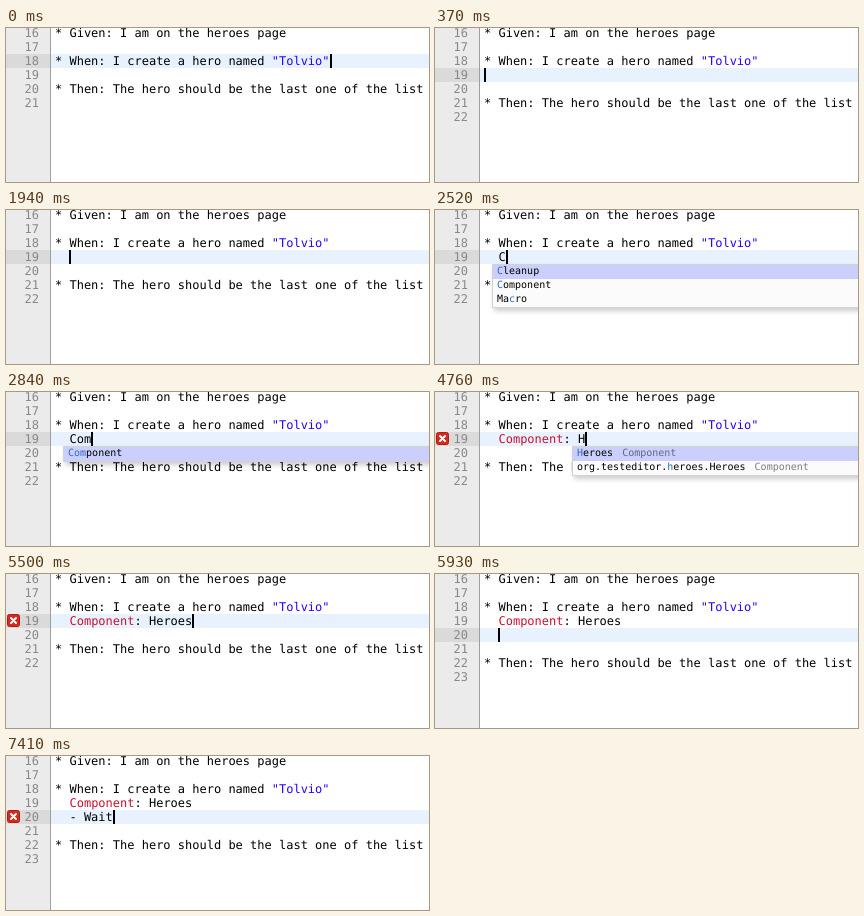
Recreate the animation shown at these times as an HTML page. Size 423x154 px, loop 8000 ms.

```html
<!DOCTYPE html>
<html>
<head>
<meta charset="utf-8">
<style>
html, body { margin: 0; width: 100%; height: 100%; overflow: hidden; background: #fff; }
#stage { position: relative; width: 423px; height: 154px; overflow: hidden;
  font: 12px/14px "DejaVu Sans Mono", monospace; text-rendering: geometricPrecision; white-space: pre; color: #000; }
#stage div, #stage svg { position: absolute; }
.gutter { left: 0; top: 0; width: 44px; height: 154px; background: #ebebeb; border-right: 1px solid #9f9f9f; }
.active { left: 45px; width: 378px; height: 14px; background: #e8f2fe; }
.mark { left: 0; width: 44px; height: 14px; background: #dadada; }
.num { left: 0; width: 33px; text-align: right; color: #888; }
.line { left: 49px; }
.str { color: #2a00ff; }
.key { color: #cc1030; }
.cursor { width: 2px; height: 14px; background: #000; }
.popup { top: 54px; width: 400px; background: #fbfbfb; border: 1px solid #d3d3d3;
  box-shadow: 2px 3px 5px rgba(0,0,0,.2); font-size: 10px; }
.item { left: 0; width: 396px; height: 14px; padding-left: 4px; }
.item:first-child { background: #cacffd; }
.hit { color: #2d69c7; }
.meta { opacity: .5; margin-left: 9px; }
</style>
</head>
<body>
<div id="stage"></div>
<script>
const stage = document.getElementById('stage');
const CHAR = 7.224, LEFT = 49, LOOP = 8000;
const COMP = '  Component', HEROES = COMP + ': Heroes';
const keywords = ['*', '-', 'Cleanup', 'Component', 'Macro', 'Mask', 'Setup'].map(s => [s, '']);
const components = ['Heroes', 'org.testeditor.heroes.Heroes'].map(s => [s, 'Component']);
const keys = query => ({ items: keywords, query, col: 2 });
const heroes = { items: components, query: 'H', col: 13 };

// time, inserted lines, options
const steps = [
  [0, []],
  [90, [], { blink: 1 }],
  [370, ['']],
  [760, [' ']],
  [910, ['  ']],
  [1560, ['  '], { blink: 1 }],
  [1940, ['  ']],
  [2000, ['  '], { popup: keys('') }],
  [2520, ['  C'], { popup: keys('C') }],
  [2750, ['  Co'], { popup: keys('C') }],
  [2800, ['  Co'], { popup: keys('Co') }],
  [2840, ['  Com'], { popup: keys('Com') }],
  [3420, [COMP]],
  [4050, [COMP + ':']],
  [4110, [COMP + ':'], { error: 1 }],
  [4170, [COMP + ': '], { error: 1 }],
  [4430, [COMP + ': H'], { error: 1 }],
  [4760, [COMP + ': H'], { error: 1, popup: heroes }],
  [5050, [COMP + ': H'], { error: 1, popup: heroes, blink: 1 }],
  [5450, [HEROES], { error: 1, popup: heroes }],
  [5500, [HEROES], { error: 1 }],
  [5930, [HEROES, '  ']],
  [6290, [HEROES, '  -']],
  [6410, [HEROES, '  - ']],
  [7050, [HEROES, '  - W']],
  [7240, [HEROES, '  - Wa']],
  [7300, [HEROES, '  - Wai']],
  [7360, [HEROES, '  - Wait']],
  [7410, [HEROES, '  - Wait'], { error: 1 }]
];

const box = (cls, y, html = '', x) =>
  `<div class="${cls}" style="top:${y}px${x === undefined ? '' : `;left:${x}px`}">${html}</div>`;
const colX = col => Math.round(LEFT + col * CHAR);
const paint = text => text
  .replace(/"\w+"/, '<span class="str">$&</span>')
  .replace(/Component/, '<span class="key">$&</span>');

// Marks the query letters in order; returns null when one is missing
function match(text, query) {
  let n = 0;
  const html = [...text].map(c =>
    n < query.length && c.toLowerCase() === query[n].toLowerCase()
      ? (n++, `<span class="hit">${c}</span>`) : c).join('');
  return n === query.length ? html : null;
}

function popupHtml({ items, query, col }) {
  const rows = items.map(([text, meta]) => [match(text, query), meta]).filter(r => r[0] !== null);
  const body = rows.map(([html, meta], i) =>
    box('item', i * 14, html + (meta && `<span class="meta">${meta}</span>`))).join('');
  return `<div class="popup" style="left:${colX(col) - 6}px;height:${rows.length * 14}px">${body}</div>`;
}

const errorIcon = y => `<svg style="left:1px;top:${y}px" width="13" height="14">
  <rect x=".5" y=".5" width="12" height="12" rx="2" fill="#d52b1e" stroke="#b01c12"/>
  <path d="M4 4l5 5M9 4l-5 5" stroke="#fff" stroke-width="2" stroke-linecap="round"/></svg>`;

function render([, added, { blink, popup, error } = {}]) {
  const lines = ['* Given: I am on the heroes page', '', '* When: I create a hero named "Tolvio"',
    ...added, '', '* Then: The hero should be the last one of the list', ''];
  const row = 2 + added.length, y = row * 14 - 2;
  stage.innerHTML = '<div class="gutter"></div>' + box('mark', y) + box('active', y) +
    lines.map((text, i) => box('num', i * 14 - 2, 16 + i) + box('line', i * 14 - 2, paint(text))).join('') +
    (error ? errorIcon(y) : '') +
    (blink ? '' : box('cursor', y, '', colX(lines[row].length))) +
    (popup ? popupHtml(popup) : '');
}

let shown;
function tick() {
  const t = performance.now() % LOOP;
  const step = steps.findLast(s => s[0] <= t);
  if (step !== shown) render(shown = step);
  requestAnimationFrame(tick);
}
tick();
</script>
</body>
</html>
```
